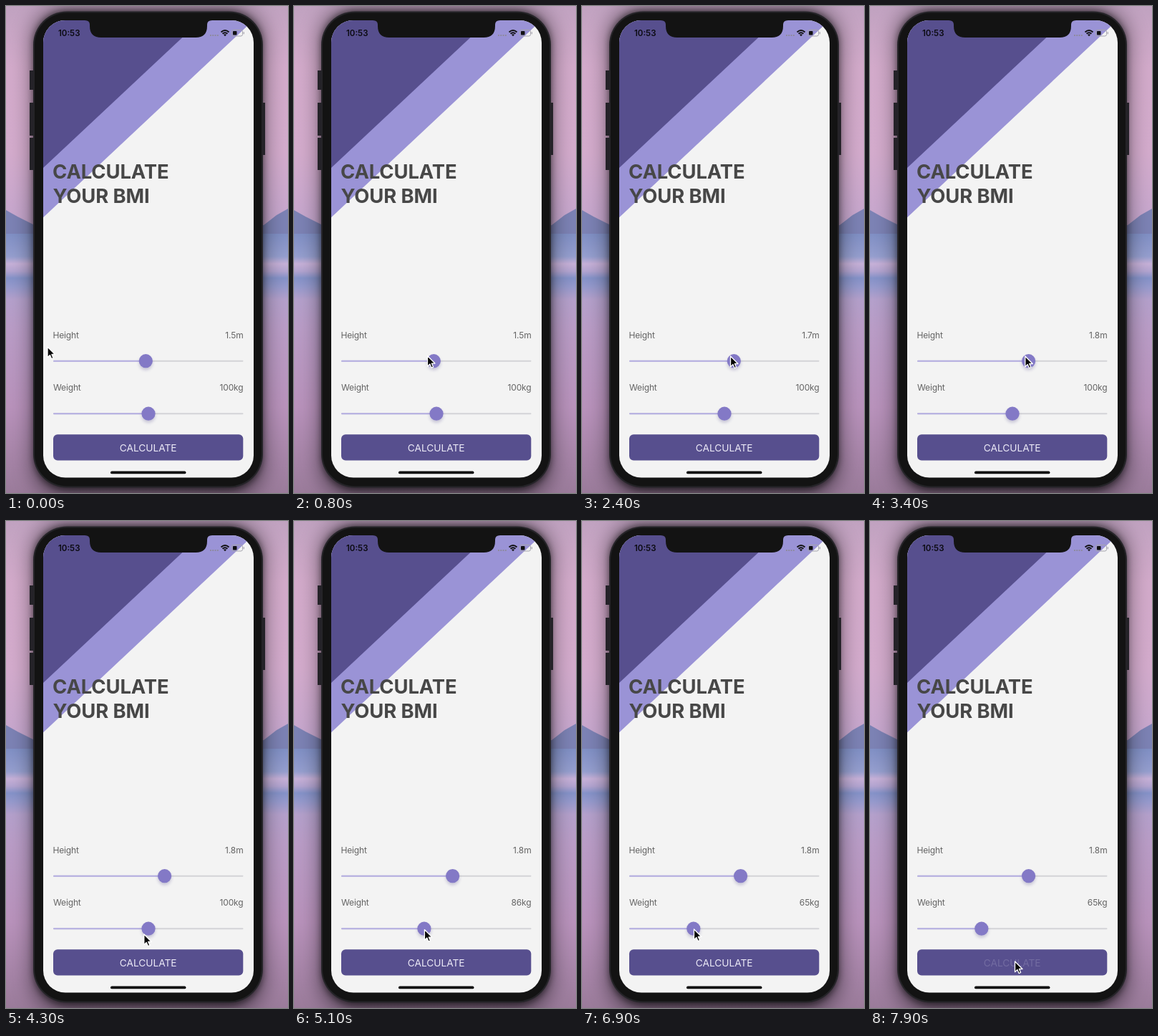
Animation, 394 px wide and 680 px high, one loop 8 s. Source, as an HTML page:

```html
<!DOCTYPE html>
<html lang="en">
<head>
<meta charset="utf-8">
<title>BMI calculator</title>
<style>
  html, body { margin: 0; width: 100%; height: 100%; overflow: hidden; }
  svg { display: block; width: 394px; height: 680px; font-family: Inter, sans-serif; }
  .title { font-size: 27.4px; font-weight: 700; letter-spacing: -.1px; fill: #474747; }
  .label { font-size: 12px; letter-spacing: -.15px; fill: #646464; }
  .end { text-anchor: end; }
</style>
</head>
<body>
<svg viewBox="0 0 394 680">
  <defs>
    <linearGradient id="sky" x2="0" y2="1">
      <stop offset="0" stop-color="#c0a2c0"/>
      <stop offset=".25" stop-color="#d2aaca"/>
      <stop offset=".6" stop-color="#d3abcc"/>
      <stop offset=".9" stop-color="#c5a6cd"/>
    </linearGradient>
    <linearGradient id="water" x2="0" y2="1">
      <stop offset="0" stop-color="#808fc4"/>
      <stop offset=".088" stop-color="#959ece"/>
      <stop offset=".116" stop-color="#c6b0d7"/>
      <stop offset=".144" stop-color="#b3a4d0"/>
      <stop offset=".171" stop-color="#8592c8"/>
      <stop offset=".204" stop-color="#9599cc"/>
      <stop offset=".254" stop-color="#b4a0cb"/>
      <stop offset=".365" stop-color="#b99cc6"/>
      <stop offset=".67" stop-color="#b892bb"/>
      <stop offset="1" stop-color="#9a7b9a"/>
    </linearGradient>
    <filter id="wide" x="-30%" y="-30%" width="160%" height="160%">
      <feGaussianBlur stdDeviation="15"/>
    </filter>
    <filter id="tight" x="-10%" y="-10%" width="120%" height="120%">
      <feGaussianBlur stdDeviation="4"/>
    </filter>
    <filter id="soft" x="-50%" y="-50%" width="200%" height="200%">
      <feGaussianBlur stdDeviation="2"/>
    </filter>
    <clipPath id="screen"><rect x="52" y="20" width="294" height="638.500" rx="31"/></clipPath>
    <g id="thumb">
      <circle cy="3" r="9.500" fill="#50488a" opacity=".28" filter="url(#soft)"/>
      <circle r="9.600" fill="#8379c6"/>
    </g>
  </defs>

  <!-- wallpaper -->
  <rect width="394" height="340" fill="url(#sky)"/>
  <path d="M0 285 L16 294 L40 306 H360 L378 292 L394 283 V340 H0Z" fill="#7c82b4"/>
  <rect y="318" width="394" height="362" fill="url(#water)"/>

  <!-- phone -->
  <rect x="38" y="4" width="321" height="680" rx="44" opacity=".55" filter="url(#wide)"/>
  <rect x="38" y="6" width="321" height="670" rx="47" opacity=".45" filter="url(#tight)"/>
  <path d="M33 90h6v27h-6zM33 135h6v46h-6zM33 184h6v45h-6zM358 135h4v73h-4z" fill="#242228"/>
  <rect x="38" y="7.500" width="321" height="665" rx="47" fill="#252428"/>
  <rect x="40" y="9.500" width="317" height="661" rx="45" fill="#131313"/>

  <g clip-path="url(#screen)">
    <rect x="52" y="20" width="294" height="639" fill="#f3f3f3"/>
    <path d="M52 20H345.600L52 295.200Z" fill="#9a93d6"/>
    <path d="M52 20H272L52 226Z" fill="#574f8e"/>
    <path d="M110 19V20Q117 20 117 26V28Q117 44 133 44H265Q281 44 281 28V26Q281 20 288 20V19Z" fill="#131313"/>
  </g>

  <!-- status bar -->
  <text x="73" y="42" font-size="11.500" font-weight="600" fill="#0c0b12">10:53</text>
  <path d="M285 41H297" stroke="#8d8a9c" stroke-width="1.800" stroke-dasharray="1.800 1.500"/>
  <g fill="none" stroke="#111" stroke-width="1.900">
    <path d="M300.500 36.500Q306 31.500 311.500 36.500M302.600 38.800Q306 35.800 309.400 38.800"/>
    <path d="M304 40L306 42.300L308 40Q306 38.600 304 40Z" fill="#111" stroke="none"/>
  </g>
  <rect x="315.500" y="33.500" width="15" height="8.500" rx="2.400" fill="none" stroke="#a5a4ad"/>
  <path d="M332.300 36.200v3" stroke="#a5a4ad" stroke-width="1.200"/>
  <rect x="317" y="35" width="5.500" height="5.500" rx="1" fill="#111"/>

  <text class="title" x="65" y="241">CALCULATE</text>
  <text class="title" x="65.500" y="275">YOUR BMI</text>

  <!-- sliders -->
  <text class="label" x="65.500" y="463.500">Height</text>
  <text class="label end" x="331.500" y="463.500" id="heightText"></text>
  <text class="label" x="66" y="537">Weight</text>
  <text class="label end" x="331.500" y="537" id="weightText"></text>
  <g stroke-width="2" stroke-linecap="round">
    <path d="M67 495.700H330.500M67 569.200H330.500" stroke="#d3d3d7"/>
    <path id="fill" stroke="#b5aee2"/>
  </g>
  <use href="#thumb" id="heightThumb"/>
  <use href="#thumb" id="weightThumb"/>

  <rect x="66" y="598.200" width="265.300" height="36.200" rx="6" fill="#574f8e"/>
  <text x="198.700" y="621.500" font-size="13.700" text-anchor="middle" fill="#eceaf7" id="button">CALCULATE</text>
  <rect x="146" y="649.500" width="105.500" height="3.800" rx="1.900" fill="#0b0b0b"/>

  <path id="cursor" d="M0 0V14.700L3.400 11.500L5.600 16.600L8.100 15.500L5.900 10.500H10.500Z"
    fill="#050505" stroke="#fff" stroke-width="1.300" stroke-linejoin="round"/>
</svg>
<script>
const LOOP = 8000, STEP = 100;
const MIN_X = 76, TRAVEL = 245, MAX_HEIGHT = 3, MAX_WEIGHT = 200;
const HEIGHT_Y = 495.7, WEIGHT_Y = 569.2;
const el = id => document.getElementById(id);
const clamp = (v, lo, hi) => Math.min(hi, Math.max(lo, v));
const move = (id, x, y) => el(id).setAttribute('transform', `translate(${x} ${y})`);

// time, x, y of the pointer tip
const path = [
  [0, 58, 476], [600, 186, 488.5], [750, 186, 488.5], [1000, 190.5, 489], [1100, 190.5, 489],
  [2000, 203.5, 489], [2400, 207.5, 489], [2900, 214.2, 489], [3400, 216.8, 489], [3800, 216.8, 489],
  [4300, 192.8, 577], [4700, 199.5, 571], [5600, 158.5, 570], [5800, 157.7, 570], [6000, 156.3, 570],
  [7200, 156.5, 570], [7600, 202.5, 615], [8000, 202.5, 615]
];

function pointer(t) {
  const i = Math.max(1, path.findIndex(key => key[0] >= t));
  const [t0, x0, y0] = path[i - 1], [t1, x1, y1] = path[i];
  const u = (t - t0) / (t1 - t0);
  const dragging = t > 1100 && t < 3400;
  const k = dragging ? u : u * u * (3 - 2 * u);
  return [x0 + (x1 - x0) * k, y0 + (y1 - y0) * k];
}

function draw(t) {
  const heightX = pointer(clamp(t, 1100, 3700))[0] + 4.8;
  const weightX = pointer(clamp(t, 4700, 6200))[0] - .5;
  const height = (heightX - MIN_X) / TRAVEL * MAX_HEIGHT;
  const weight = (weightX - MIN_X) / TRAVEL * MAX_WEIGHT;

  move('cursor', ...pointer(t));
  move('heightThumb', heightX, HEIGHT_Y);
  move('weightThumb', weightX, WEIGHT_Y);
  el('fill').setAttribute('d', `M67 ${HEIGHT_Y}H${heightX}M67 ${WEIGHT_Y}H${weightX}`);
  el('heightText').textContent = height.toFixed(1) + 'm';
  el('weightText').textContent = Math.round(weight) + 'kg';
  el('button').setAttribute('opacity', clamp(1 - (t - 7700) / 100 * .42, .18, 1));
}

function frame(now) {
  draw(Math.floor(now % LOOP / STEP) * STEP);
  requestAnimationFrame(frame);
}
requestAnimationFrame(frame);
</script>
</body>
</html>
```
